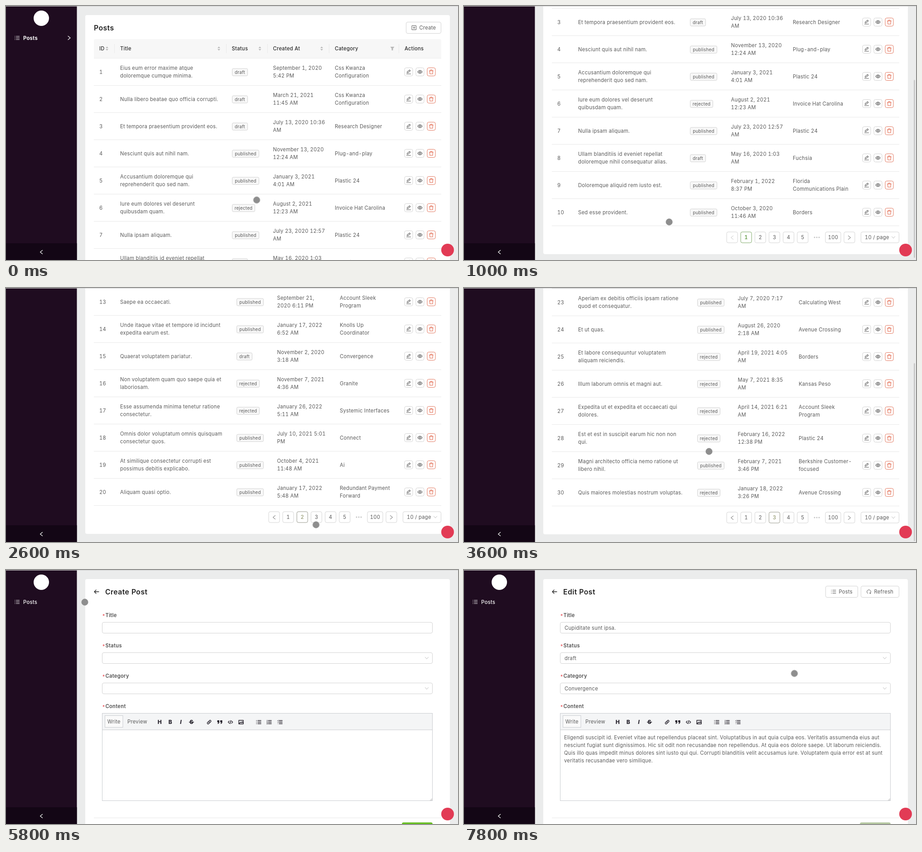
Recreate the animation shown at these times as an HTML page. Size 998 by 561 pixels, loop 8000 ms.

```html
<!DOCTYPE html>
<html lang="en">
<head>
<meta charset="utf-8">
<title>Posts admin</title>
<style>
html, body { margin: 0; width: 100%; height: 100%; overflow: hidden; background: #ebecec; }
svg { display: block; width: 998px; height: 561px; }
text { font-family: Inter, sans-serif; letter-spacing: .025em; font-variant-numeric: tabular-nums; white-space: pre; }
.line { fill: none; stroke: currentColor; stroke-linecap: round; stroke-linejoin: round; }

/* Every animation shares one 8 s clock that ticks every 200 ms (2.5 %). */
.page, .bar, .view, .cursor, .filled {
  animation: 8s -10ms infinite step-end;
}
.page { --k: -1px; animation-name: scroll; }
.bar { --k: .705px; animation-name: scroll, bar; }
.cursor { animation-name: cursor; }
.first { animation-name: first; }
.second { animation-name: second; }
.third { animation-name: third; }
.list { animation-name: list; }
.form { animation-name: form; }
.create { animation-name: create; }
.edit { animation-name: edit; }
.filled { animation-name: filled; }

@keyframes scroll {
  0% { transform: translateY(0); }
  2.5% { transform: translateY(calc(40 * var(--k))); }
  5% { transform: translateY(calc(120 * var(--k))); }
  7.5% { transform: translateY(calc(185 * var(--k))); }
  10% { transform: translateY(calc(218 * var(--k))); }
  12.5% { transform: translateY(calc(230 * var(--k))); }
  15% { transform: translateY(calc(235 * var(--k))); }
  37.5% { transform: translateY(calc(234 * var(--k))); }
  47.5% { transform: translateY(calc(160 * var(--k))); }
  50% { transform: translateY(calc(50 * var(--k))); }
  52.5%, 100% { transform: translateY(0); }
}
@keyframes bar { 0%, 17.5%, 52.5%, 100% { opacity: 0; } 2.5%, 42.5% { opacity: 1; } }
@keyframes cursor {
  0% { transform: translate(553.5px, 428.5px); }
  7.5% { transform: translate(553.5px, 428.5px); animation-timing-function: steps(2); }
  12.5% { transform: translate(453px, 477px); animation-timing-function: steps(3); }
  20% { transform: translate(654px, 512px); }
  25% { transform: translate(654px, 512px); animation-timing-function: steps(3); }
  32.5% { transform: translate(684.5px, 523px); }
  37.5% { transform: translate(684.5px, 515px); animation-timing-function: steps(3); }
  45% { transform: translate(541px, 361px); animation-timing-function: steps(4); }
  55% { transform: translate(804.5px, 235.5px); animation-timing-function: steps(2); }
  60% { transform: translate(921px, 50px); }
  65% { transform: translate(921px, 50px); animation-timing-function: steps(3); }
  72.5% { transform: translate(174px, 71px); animation-timing-function: steps(2); }
  77.5% { transform: translate(60px, 71px); }
  80% { transform: translate(60px, 71px); animation-timing-function: steps(3); }
  87.5% { transform: translate(889px, 147px); }
  92.5% { transform: translate(889px, 147px); animation-timing-function: steps(2); }
  97.5%, 100% { transform: translate(729.5px, 228.5px); }
}
@keyframes first { 0%, 80% { opacity: 1; } 25%, 92.5%, 100% { opacity: 0; } }
@keyframes second { 0%, 37.5%, 100% { opacity: 0; } 25% { opacity: 1; } }
@keyframes third { 0%, 65%, 100% { opacity: 0; } 37.5% { opacity: 1; } }
@keyframes list { 0%, 80% { opacity: 1; } 65%, 92.5%, 100% { opacity: 0; } }
@keyframes form { 0%, 80% { opacity: 0; } 65%, 92.5%, 100% { opacity: 1; } }
@keyframes create { 0%, 80%, 100% { opacity: 0; } 65% { opacity: 1; } }
@keyframes edit { 0% { opacity: 0; } 92.5%, 100% { opacity: 1; } }
@keyframes filled { 0% { opacity: 0; } 95%, 100% { opacity: 1; } }
</style>
</head>
<body>
<svg id="stage" viewBox="0 0 998 561"></svg>
<script>
const STATUS = { d: 'draft', p: 'published', r: 'rejected' };

// title; status; created at; category  ("|" breaks a line)
const PAGES = [
  { name: 'first', cols: [486, 577, 713], rows: `
Eius eum error maxime atque|doloremque cumque minima.;d;September 1, 2020|5:42 PM;Css Kwanza|Configuration
Nulla libero beatae quo officia corrupti.;d;March 21, 2021|11:45 AM;Css Kwanza|Configuration
Et tempora praesentium provident eos.;d;July 13, 2020 10:36|AM;Research Designer
Nesciunt quis aut nihil nam.;p;November 13, 2020|12:24 AM;Plug-and-play
Accusantium doloremque qui|reprehenderit quo sed nam.;p;January 3, 2021|4:01 AM;Plastic 24
Iure eum dolores vel deserunt|quibusdam quam.;r;August 2, 2021|12:23 AM;Invoice Hat Carolina
Nulla ipsam aliquam.;p;July 23, 2020 12:57|AM;Plastic 24
Ullam blanditiis id eveniet repellat|doloremque nihil consequatur alias.;d;May 16, 2020 1:03|AM;Fuchsia
Doloremque aliquid rem iusto est.;p;February 1, 2022|8:37 PM;Florida|Communications Plain
Sed esse provident.;p;October 3, 2020|11:46 AM;Borders` },
  { name: 'second', cols: [496, 586, 724], rows: `
Cupiditate sunt ipsa.;d;March 2, 2021|9:14 AM;Convergence
Aut rerum quia.;p;May 11, 2021|2:40 PM;Granite
Saepe ea occaecati.;p;September 21,|2020 6:11 PM;Account Sleek|Program
Unde itaque vitae et tempore id incidunt|expedita earum est.;p;January 17, 2022|6:52 AM;Knolls Up|Coordinator
Quaerat voluptatem pariatur.;d;November 2, 2020|3:18 AM;Convergence
Non voluptatem quam quo saepe quia et|laboriosam.;r;November 7, 2021|4:36 AM;Granite
Esse assumenda minima tenetur ratione|consectetur.;r;January 26, 2022|5:11 AM;Systemic Interfaces
Omnis dolor voluptatum omnis quisquam|consectetur quos.;p;July 10, 2021 5:01|PM;Connect
At similique consectetur corrupti est|possimus debitis explicabo.;p;October 4, 2021|11:48 AM;Ai
Aliquam quasi optio.;p;January 17, 2022|5:48 AM;Redundant Payment|Forward` },
  { name: 'third', cols: [502, 592, 726], rows: `
Et sunt ut explicabo dolorem quaerat|consequuntur eum iusto eaque.;d;July 13, 2020 7:52|PM;Invoice Hat Carolina
Quia rerum consectetur voluptatem et sint|ipsa et ipsum voluptates.;r;August 1, 2020|9:05 AM;Redundant Payment|Forward
Aperiam ex debitis officiis ipsam ratione|quod et consequatur.;p;July 7, 2020 7:17|AM;Calculating West
Et ut quas.;p;August 26, 2020|2:18 AM;Avenue Crossing
Et labore consequuntur voluptatem|aliquam reiciendis.;r;April 19, 2021 4:05|AM;Borders
Illum laborum omnis et magni aut.;r;May 7, 2021 8:35|AM;Kansas Peso
Expedita ut et expedita et occaecati qui|dolores.;r;April 14, 2021 6:21|AM;Account Sleek|Program
Est et est in suscipit earum hic non non|qui.;r;February 16, 2022|12:38 PM;Plastic 24
Magni architecto officia nemo ratione ut|libero nihil.;p;February 7, 2021|3:46 PM;Berkshire Customer-|focused
Quis maiores molestias nostrum voluptas.;r;January 18, 2022|3:26 PM;Avenue Crossing` }
];

const CONTENT = `Eligendi suscipit id. Eveniet vitae aut repellendus placeat sint. Voluptatibus in aut quia culpa eos. Veritatis assumenda eius aut|nesciunt fugiat sunt dignissimos. Hic sit odit non recusandae non repellendus. At quia eos dolore saepe. Ut laborum reiciendis.|Quis illo quas impedit minus dolores sint iusto qui qui. Corrupti blanditiis velit accusamus iure. Voluptatem quia error est at sunt|veritatis recusandae vero similique.`;

// y is the vertical middle of the line
const text = (x, y, s, { size = 11.2, fill = '#595959', weight = 400, anchor = 'start', extra = '' } = {}) =>
  `<text x="${x}" y="${y + size * .36}" text-anchor="${anchor}" style="font-size:${size}px;fill:${fill};font-weight:${weight}" ${extra}>${s}</text>`;
const lines = (x, y, s) => {
  const parts = s.split('|');
  return parts.map((p, i) => text(x, y + (i - (parts.length - 1) / 2) * 17.2, p)).join('');
};
const rect = (x, y, w, h, fill, stroke = 'none', r = 0) =>
  `<rect x="${x}" y="${y}" width="${w}" height="${h}" rx="${r}" fill="${fill}" stroke="${stroke}"/>`;
const box = (x, y, w, h, stroke = '#d3d3d3', r = 3.5) => rect(x + .5, y + .5, w - 1, h - 1, '#fff', stroke, r);
const path = (x, y, d, color = '#595959', width = 1) =>
  `<path class="line" transform="translate(${x} ${y})" style="color:${color};stroke-width:${width}" d="${d}"/>`;
const solid = (x, y, d, color) => `<path transform="translate(${x} ${y})" fill="${color}" d="${d}"/>`;
const group = (cls, ...parts) => `<g class="${cls}">${parts.join('')}</g>`;

const ICON = {
  list: 'M-5-3.5h.5M-2-3.5H5M-5 0h.5M-2 0H5M-5 3.5h.5M-2 3.5H5',
  left: 'M2.5-4L-2.5 0L2.5 4',
  right: 'M-2.5-4L2.5 0L-2.5 4',
  down: 'M-3.5-2L0 2L3.5-2',
  back: 'M5 0H-5M-1-4L-5 0L-1 4',
  plus: 'M-4.5-4.5h9v9h-9zM-2.2 0h4.4M0-2.2v4.4',
  reload: 'M-2.2 4A4.4 4.4 0 1 1 2.2 4M2.2 1.9V4h2',
  pencil: 'M-4.5 4.5h9M-3.5 2l.4-2.2L2-4.4L3.8-2.7L-1.3 1.8z',
  eye: 'M-5 0Q0-7 5 0Q0 7-5 0zM-1.6 0a1.6 1.6 0 1 0 3.2 0a1.6 1.6 0 1 0-3.2 0',
  trash: 'M-4.5-2.5h9M-1.8-2.7v-1.8h3.6v1.8M-3.5-2.3l.5 6.8h6l.5-6.8',
  link: 'M-1 1a2 2 0 0 0 2.8 0l2-2a2 2 0 0 0-2.8-2.8l-1 1M1-1a2 2 0 0 0-2.8 0l-2 2a2 2 0 0 0 2.8 2.8l1-1',
  code: 'M-2.5-2.5L-5 0L-2.5 2.5M2.5-2.5L5 0L2.5 2.5M.8-3.5L-.8 3.5',
  image: 'M-5-4H5V4H-5zM-4 3L-1.5 0L.5 1.5L2.5-1L4.5 2',
  quote: 'M-5.5-4h4.5v4Q-1 3-4.5 4V2Q-3 1.5-3 .5h-2.5zM1-4h4.5v4Q5.5 3 2 4V2Q3.5 1.5 3.5 .5H1z',
  bullets: 'M-2-3.5H5M-2 0H5M-2 3.5H5',
  digits: 'M-4.5-4.5v2M-5-1h1L-5 1h1M-5 2.5h1v2h-1',
  checks: 'M-5.5-3.5l.8.8l1.3-1.5M-5.5 0l.8.8l1.3-1.5M-5 3.5h.2'
};

const sorter = x => solid(x, 94, 'M-3-1L0-4.5L3-1zM-3 1L0 4.5L3 1z', '#b9b9b9');
const button = (x, w, label, icon) =>
  box(x, 35, w, 26) + path(x + 18, 48, ICON[icon]) + text(x + 29.5, 48, label);

function tag(x, y, s) {
  const width = { draft: 35, published: 60, rejected: 51 }[s];
  return rect(x + .5, y - 8, width - 1, 16, '#f8f8f8', '#d2d2d2', 2.5) +
    text(x + width / 2, y, s, { size: 9.8, anchor: 'middle' });
}

function tableRow(record, i, pageIndex, [a, b, c]) {
  const [title, status, date, category] = record.split(';');
  const y = 145.5 + 60 * i;
  const action = (x, icon, color, border) =>
    box(x - 9.5, y - 9.5, 19, 19, border) + path(x, y, ICON[icon], color, 1.1);
  return text(206, y, pageIndex * 10 + i + 1) + lines(252, y, title) +
    tag(a + 13, y + .7, STATUS[status]) + lines(b + 12.5, y, date) + lines(c + 13, y, category) +
    action(889, 'pencil', '#555') + action(914, 'eye', '#555') +
    action(939, 'trash', '#e1664b', '#e2765d') + rect(194, y + 29.5, 767, 1, '#e8e8e8');
}

function pagination(active) {
  const y = 741;
  const item = (x, label, on, w = 25) => {
    const ink = active ? '#a0a581' : '#629c45';
    const edge = active ? '#96978b' : '#7ba765';
    return box(x - w / 2, y - 12.5, w, 25, on ? edge : undefined) +
      text(x, y, label, { anchor: 'middle', fill: on ? ink : '#595959', weight: on ? 600 : 400 });
  };
  return item(592, '') + path(592, y + .5, ICON.left, active ? '#595959' : '#c4c4c4') +
    [1, 2, 3, 4, 5].map((n, i) => item(623 + 31.2 * i, n, i === active)).join('') +
    [774, 779, 784].map(x => `<circle cx="${x}" cy="${y}" r="1.5" fill="#c2c2c2"/>`).join('') +
    item(815, 100, false, 35) + item(851, '') + path(851, y + .5, ICON.right) +
    box(876, y - 12.5, 85, 25) + text(885, y, '10 / page') + path(948, y, ICON.down, '#bdbdbd');
}

function tablePage({ name, cols, rows }, index) {
  const [a, b, c] = cols;
  const heads = [[206, 'ID'], [252, 'Title'], [a + 12.5, 'Status'], [b + 12.5, 'Created At'], [c + 13, 'Category'], [880, 'Actions']];
  return group('view ' + name,
    heads.map(([x, s]) => text(x, 94, s, { weight: 500, fill: '#2b2b2b' })).join(''),
    [239, ...cols, 867].map(x => rect(x, 84, 1, 20, '#e9e9e9')).join(''),
    [223, a - 16, b - 16.5, c - 16].map(sorter).join(''),
    solid(853, 94, 'M-4.5-4h9L1.5 0V4h-3V0z', '#b9b9b9'),
    rows.trim().split('\n').map((r, i) => tableRow(r, i, index, cols)).join(''),
    pagination(index));
}

const menu = (weight, ...more) => path(24.5, 70.5, ICON.list, '#fff') +
  text(38, 70.5, 'Posts', { fill: '#fff', weight }) + more.join('');
const heading = (x, s) => text(x, 48, s, { size: 15.8, weight: 600, fill: '#222' });

function toolbar() {
  const ink = '#24202a';
  const glyph = (x, s, extra) => text(x, 336, s, { size: 12, weight: 800, fill: ink, anchor: 'middle', extra });
  const icon = (x, d, w = 1.4) => path(x, 336, d, ink, w);
  return rect(212.5, 316.5, 729, 193, '#fff', '#c9ccd0') + rect(213, 317, 728, 36, '#f4f5f6') +
    rect(213, 352.5, 728, 1, '#c9ccd0') + rect(218.5, 321.5, 39.5, 26, '#fafafa', '#c9ccd0') +
    text(238.3, 335, 'Write', { anchor: 'middle' }) + text(290, 335, 'Preview', { anchor: 'middle' }) +
    glyph(339.5, 'H') + glyph(363, 'B') + glyph(386, 'I', 'font-style="italic"') +
    glyph(409.5, 'S') + icon(409.5, 'M-5 0H5') + icon(448.5, ICON.link) +
    solid(472, 336, ICON.quote, ink) + icon(495.5, ICON.code) + icon(519, ICON.image) +
    icon(558, ICON.bullets + 'M-5-3.5h.2M-5 0h.2M-5 3.5h.2') +
    icon(581, ICON.bullets) + icon(581, ICON.digits, .8) +
    icon(605, ICON.bullets) + icon(605, ICON.checks, .9) +
    path(938.5, 507, 'M2-2L-2 2M2 .5L.5 2', '#999', .8);
}

function formPage() {
  const label = (s, i) => text(212, 102 + 67 * i, '*', { fill: '#e5484d' }) +
    text(219.5, 100 + 67 * i, s, { weight: 600, fill: '#505050' });
  return group('view form',
    rect(175, 20, 805, 560, '#fff', 'none', 4), path(200, 48, ICON.back, '#222', 1.3),
    ['Title', 'Status', 'Category', 'Content'].map(label).join(''),
    [115, 182, 249].map(y => box(212, y, 730, 25)).join(''),
    [194.5, 261.5].map(y => path(929, y, ICON.down, '#bdbdbd')).join(''),
    toolbar(), rect(194, 547, 767, 1, '#e8e8e8'), menu(500));
}

const page = group('page',
  `<circle cx="78" cy="27" r="17" fill="#fff"/>`,
  group('view list',
    menu(700, path(139.5, 70.5, ICON.right, '#fff', 1.2)),
    rect(175, 20, 805, 758, '#fff', 'none', 4),
    heading(194, 'Posts'), button(883, 78, 'Create', 'plus'),
    `<path d="M194 115V77a4 4 0 0 1 4-4H957a4 4 0 0 1 4 4V115z" fill="#f7f7f7"/>`,
    rect(194, 115, 767, 1, '#ededed'),
    PAGES.map(tablePage).join('')),
  formPage(),
  group('view create', heading(219, 'Create Post'), rect(874, 557.5, 68, 25, '#67be23', 'none', 4)),
  group('view edit',
    heading(219, 'Edit Post'), button(798, 72, 'Posts', 'list'), button(876, 85, 'Refresh', 'reload'),
    rect(874, 557.5, 68, 25, '#b4c79f', 'none', 4),
    group('filled',
      text(222, 127.5, 'Cupiditate sunt ipsa.'), text(222, 194.5, 'draft'), text(222, 261.5, 'Convergence'),
      lines(221, 395.5, CONTENT))));

document.getElementById('stage').innerHTML =
  rect(0, 0, 998, 561, '#ebecec') + rect(0, 0, 156.5, 561, '#1f0c20') + page +
  rect(0, 524, 156.5, 37, '#130615') + path(78, 543.5, ICON.left, '#fff', 1.2) +
  rect(0, 0, 998, 1, '#cfcfcf') +
  group('bar', rect(993, 1, 3, 393, '#c9c9c9', 'none', 1.5)) +
  `<circle cx="975" cy="539" r="14" fill="#e23b55"/>` +
  `<circle class="cursor" r="7.2" fill="#8e8e8e" stroke="#858585" stroke-width=".6"/>`;
</script>
</body>
</html>
```
